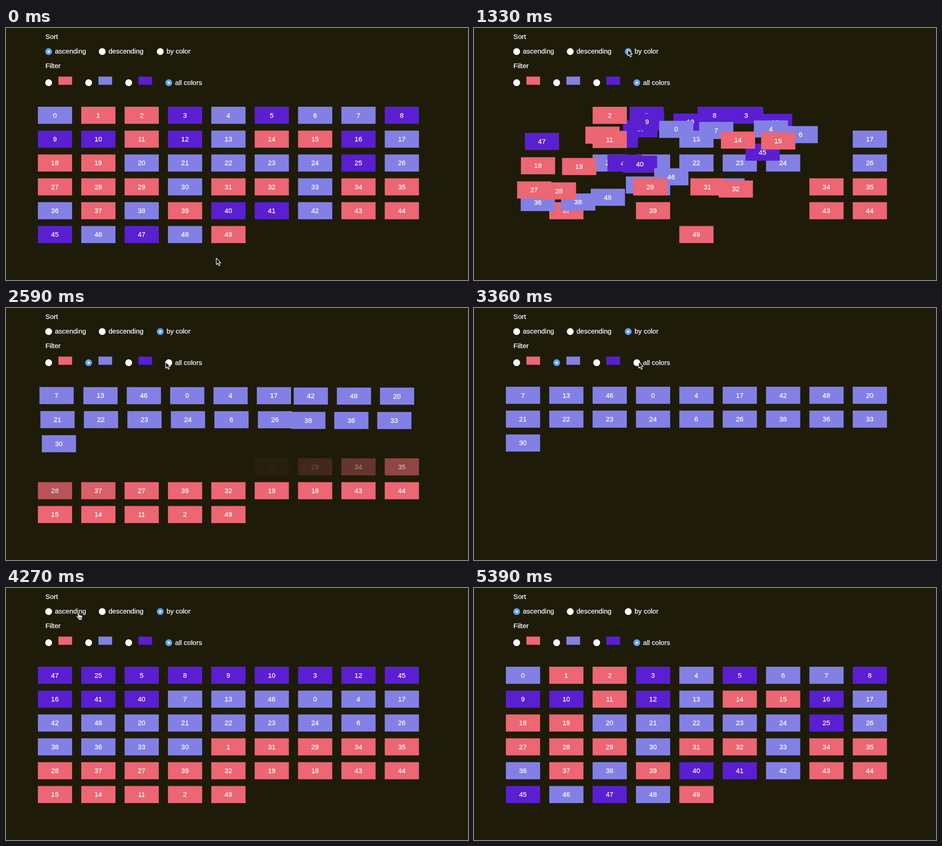
These frames come from a looping animation (1013 by 553 pixels, 5460 ms). An HTML page with a canvas:

```html
<!DOCTYPE html>
<html lang="en">
<head>
<meta charset="utf-8">
<title>Sort and filter</title>
<style>
  html, body { margin: 0; width: 100%; height: 100%; overflow: hidden; background: #1e1c09; }
  canvas { display: block; width: 1013px; height: 553px; }
</style>
</head>
<body>
<canvas id="stage"></canvas>
<script>
const W = 1013, H = 553, LOOP = 5460, STEP = 70;
const BG = '#1e1c09';
const COLORS = { P: '#5a1fd1', B: '#8380e5', R: '#ec6673' };
const canvas = document.getElementById('stage');
const ctx = canvas.getContext('2d');
const ratio = window.devicePixelRatio || 1;
canvas.width = W * ratio;
canvas.height = H * ratio;

// Colour initials of the tiles, row by row.
const initials = 'BRRPBPBBP' + 'PPRPBRRPB' + 'RRBBBBBPB' + 'RRRBRRBRR' + 'BRBRPPBRR' + 'PBPBR';
const compareColor = (a, b) => 'PBR'.indexOf(initials[a]) - 'PBR'.indexOf(initials[b]);

// Unstable median-of-three quicksort; with three colours, short runs are uniform.
function quicksort(a, cmp, from = 0, to = a.length) {
  if (to - from <= 10) return a;
  const mid = from + ((to - from) >> 1);
  let [first, pivot, last] = [a[from], a[to - 1], a[mid]];
  if (cmp(first, pivot) > 0) [first, pivot] = [pivot, first];
  if (cmp(first, last) >= 0) [first, pivot, last] = [last, first, pivot];
  else if (cmp(pivot, last) > 0) [pivot, last] = [last, pivot];
  const swap = (i, j) => { [a[i], a[j]] = [a[j], a[i]]; };
  let low = from + 1, high = to - 1;
  a[from] = first;
  a[high] = last;
  a[mid] = a[low];
  a[low] = pivot;
  for (let i = low + 1; i < high; i++) {
    if (cmp(a[i], pivot) > 0) {
      do high--; while (high > i && cmp(a[high], pivot) > 0);
      if (high === i) break;
      swap(i, high);
    }
    if (cmp(a[i], pivot) < 0) swap(i, low++);
  }
  quicksort(a, cmp, from, low);
  return quicksort(a, cmp, high, to);
}

const ascending = [...initials].map((_, i) => i);
const byColor = quicksort([...ascending], compareColor);
const onlyBlue = byColor.filter(n => initials[n] === 'B');

// Radio click time, moment the tiles start to move, old and new order.
const changes = [
  { click: 1130, move: 1166, from: ascending, to: byColor },
  { click: 2180, move: 2224, from: byColor, to: onlyBlue },
  { click: 3420, move: 3460, from: onlyBlue, to: byColor },
  { click: 4480, move: 4515, from: byColor, to: ascending }
];
const OMEGA = 0.0175, MOVE_GAP = 3.38, FADE_GAP = 19.5, FADE = 145;

const clamp = v => Math.min(1, Math.max(0, v));
const ease = v => (1 - Math.cos(Math.PI * clamp(v))) / 2;
const mix = (a, b, p) => a + (b - a) * p;
const spring = ms => {
  const x = OMEGA * Math.max(0, ms);
  return 1 - (1 + x) * Math.exp(-x);
};
const slot = i => ({ x: 69.9 + (i % 9) * 95.07, y: 172.8 + Math.floor(i / 9) * 52.35 });
// The first tile leads; the next six leave together.
const delay = i => (i && Math.max(i, 6)) * MOVE_GAP;

function text(str, x, y, align = 'left') {
  ctx.textAlign = align;
  ctx.fillStyle = ctx.strokeStyle = '#fff';
  ctx.lineWidth = 0.25;
  ctx.fillText(str, x, y);
  ctx.strokeText(str, x, y);
}

function tile(n, { x, y }, alpha = 1) {
  ctx.globalAlpha = alpha;
  ctx.fillStyle = COLORS[initials[n]];
  ctx.fillRect(x, y, 75, 37.5);
  text(n, x + 37.3, y + 23.8, 'center');
  ctx.globalAlpha = 1;
}

function drawTiles(t) {
  const change = changes.filter(c => t >= c.click).pop();
  if (!change) {
    ascending.forEach((n, i) => tile(n, slot(i)));
    return;
  }
  const { from, to, move } = change;
  const fade = i => ease((t - move + 13 - i * FADE_GAP) / FADE);
  const active = [];
  let entered = 0;
  to.forEach((n, i) => {
    const old = from.indexOf(n);
    const end = slot(i);
    if (old === i) {
      tile(n, end);
    } else if (old < 0) {
      active.push([n, end, fade(entered++)]);
    } else {
      const start = slot(old);
      const p = spring(t - move - delay(i));
      active.push([n, { x: mix(start.x, end.x, p), y: mix(start.y, end.y, p) }]);
    }
  });
  active.forEach(args => tile(...args));
  from.filter(n => !to.includes(n))
    .forEach((n, i) => tile(n, slot(from.indexOf(n)), 1 - fade(i)));
}

const options = [
  { x: 93.5, y: 51.7, label: 'ascending' },
  { x: 211, y: 51.7, label: 'descending' },
  { x: 338.2, y: 51.7, label: 'by color' },
  { x: 93.5, y: 120, swatch: 'R' },
  { x: 181.2, y: 120, swatch: 'B' },
  { x: 269, y: 120, swatch: 'P' },
  { x: 357, y: 120, label: 'all colors' }
];

function disc(x, y, r, color) {
  ctx.fillStyle = color;
  ctx.beginPath();
  ctx.arc(x, y, r, 0, Math.PI * 2);
  ctx.fill();
}

function drawControls(t) {
  const sorted = t >= changes[0].click && t < changes[3].click;
  const filtered = t >= changes[1].click && t < changes[2].click;
  const chosen = [sorted ? 'by color' : 'ascending', filtered ? 'B' : 'all colors'];
  text('Sort', 86.5, 24.3);
  text('Filter', 86.5, 88);
  options.forEach(({ x, y, label, swatch }) => {
    const on = chosen.includes(label || swatch);
    disc(x, y, 7.5, on ? '#62a1ee' : '#fff');
    if (on) disc(x, y, 2.5, '#fff');
    if (label) {
      text(label, x + 13.7, y + 4.6);
    } else {
      ctx.fillStyle = COLORS[swatch];
      ctx.fillRect(x + 21.4, y - 13.4, 30, 18);
    }
  });
}

// Resting places of the pointer: arrival, departure, x, y.
const stops = [
  [0, 210, 461, 505],
  [980, 1360, 337, 47],
  [1720, 2220, 218, 107],
  [2570, 2800, 350, 118],
  [3150, 3450, 361, 118],
  [4200, 4560, 158, 54],
  [5200, LOOP, 420, 590]
];
const arrow = new Path2D('M0 0V14.2L3.3 11.2L5.6 16.6L8.1 15.5L5.8 10.3H10.2Z');
const hand = new Path2D('M-1.6 1Q0-1 1.5 1L2.7 6Q4-1 5 6Q7 4.6 7.4 7Q9.6 6 9.6 9' +
  'L8.7 13V16H1V14L-4 9Q-4.6 7-2.6 7.2L-.4 9Z');
const fingers = new Path2D('M2.3 10V13.5M4.5 10V13.5M6.6 10V13.5');

function isOverLabel(px, py) {
  return options.some(({ x, y, label }) => {
    const width = label ? ctx.measureText(label).width : 38;
    return px > x + 13.5 && px < x + 13.5 + width && Math.abs(py - y + 2) < 12;
  });
}

function drawPointer(t) {
  const k = stops.filter(s => s[0] <= t).length - 1;
  const [, leave, x0, y0] = stops[k];
  const [arrive, , x1, y1] = stops[k + 1] || [LOOP + 1, 0, x0, y0];
  const p = ease((t - leave) / (arrive - leave));
  const x = mix(x0, x1, p), y = mix(y0, y1, p);
  const isHand = isOverLabel(x, y);
  const shape = isHand ? hand : arrow;
  ctx.save();
  ctx.translate(x, y);
  ctx.lineJoin = 'round';
  ctx.lineWidth = 1.2;
  ctx.fillStyle = isHand ? '#fff' : '#111';
  ctx.strokeStyle = isHand ? '#222' : '#fff';
  ctx.fill(shape);
  ctx.stroke(shape);
  if (isHand) ctx.stroke(fingers);
  ctx.restore();
}

function draw() {
  const t = Math.floor((performance.now() % LOOP) / STEP) * STEP;
  ctx.setTransform(ratio, 0, 0, ratio, 0, 0);
  ctx.fillStyle = BG;
  ctx.fillRect(0, 0, W, H);
  ctx.font = '15px "Liberation Sans", Arial, sans-serif';
  drawControls(t);
  drawTiles(t);
  drawPointer(t);
  requestAnimationFrame(draw);
}
draw();
</script>
</body>
</html>
```
